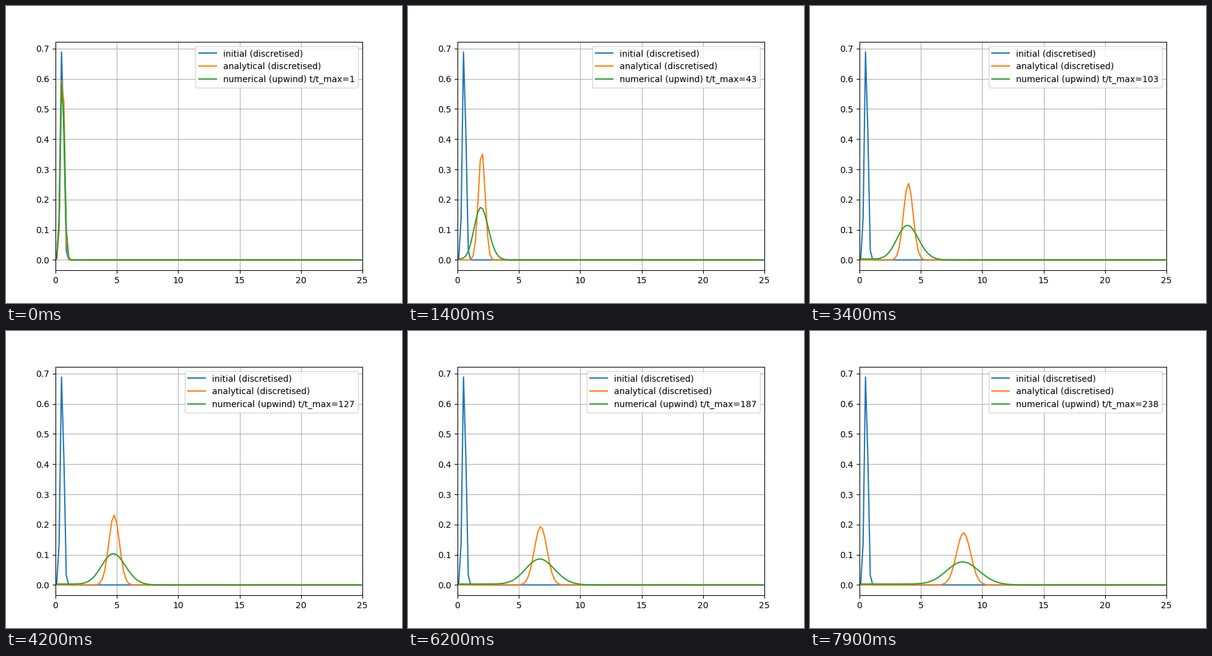
Animation, 640 px wide and 480 px high, one loop 8 s. Source, as a matplotlib script:

```python
import numpy as np
import matplotlib.pyplot as plt
from matplotlib.animation import FuncAnimation

FRAMES, INTERVAL, STRIDE = 80, 100, 3
CELLS, LENGTH = 128, 25.0
START, SPEED = 0.54, 0.03335        # centre of the pulse, shift per step
VAR0, SPREAD = 0.0181, 0.00132      # variance, growth per step
MASS, INFLOW = 0.25, 0.003
SUBSTEPS = 2

dx = LENGTH / CELLS
x = (np.arange(CELLS) + 0.5) * dx


def analytical(n):
    var = VAR0 + SPREAD * n
    gauss = np.exp(-(x - START - SPEED * n) ** 2 / (2 * var))
    return MASS / np.sqrt(2 * np.pi * var) * gauss


def upwind(psi):
    c = SPEED / dx / SUBSTEPS
    mu = SPREAD / (2 * dx ** 2) / SUBSTEPS
    for _ in range(SUBSTEPS):
        p = np.concatenate(([INFLOW], psi, [psi[-1]]))
        flux = c * p[:-1] - mu * np.diff(p)
        psi = psi - np.diff(flux)
    return psi


def label(n):
    return f"numerical (upwind) t/t_max={n}"


initial = analytical(0)
numerical = [initial]
for _ in range(STRIDE * FRAMES):
    numerical.append(upwind(numerical[-1]))

fig, ax = plt.subplots(figsize=(6.4, 4.8), dpi=100)
ax.plot(x, initial, label="initial (discretised)")
exact_line, = ax.plot(x, analytical(1), label="analytical (discretised)")
upwind_line, = ax.plot(x, numerical[1], label=label(1))
peak = initial.max()
ax.set_xlim(0, LENGTH)
ax.set_ylim(-0.05 * peak, 1.05 * peak)
ax.grid()
legend = ax.legend(loc="upper right")


def update(i):
    n = 1 + STRIDE * i
    exact_line.set_ydata(analytical(n))
    upwind_line.set_ydata(numerical[n])
    legend.get_texts()[2].set_text(label(n))
    return exact_line, upwind_line, legend


anim = FuncAnimation(fig, update, frames=FRAMES, interval=INTERVAL,
                     repeat=True, repeat_delay=0, blit=False)
plt.show()
```
